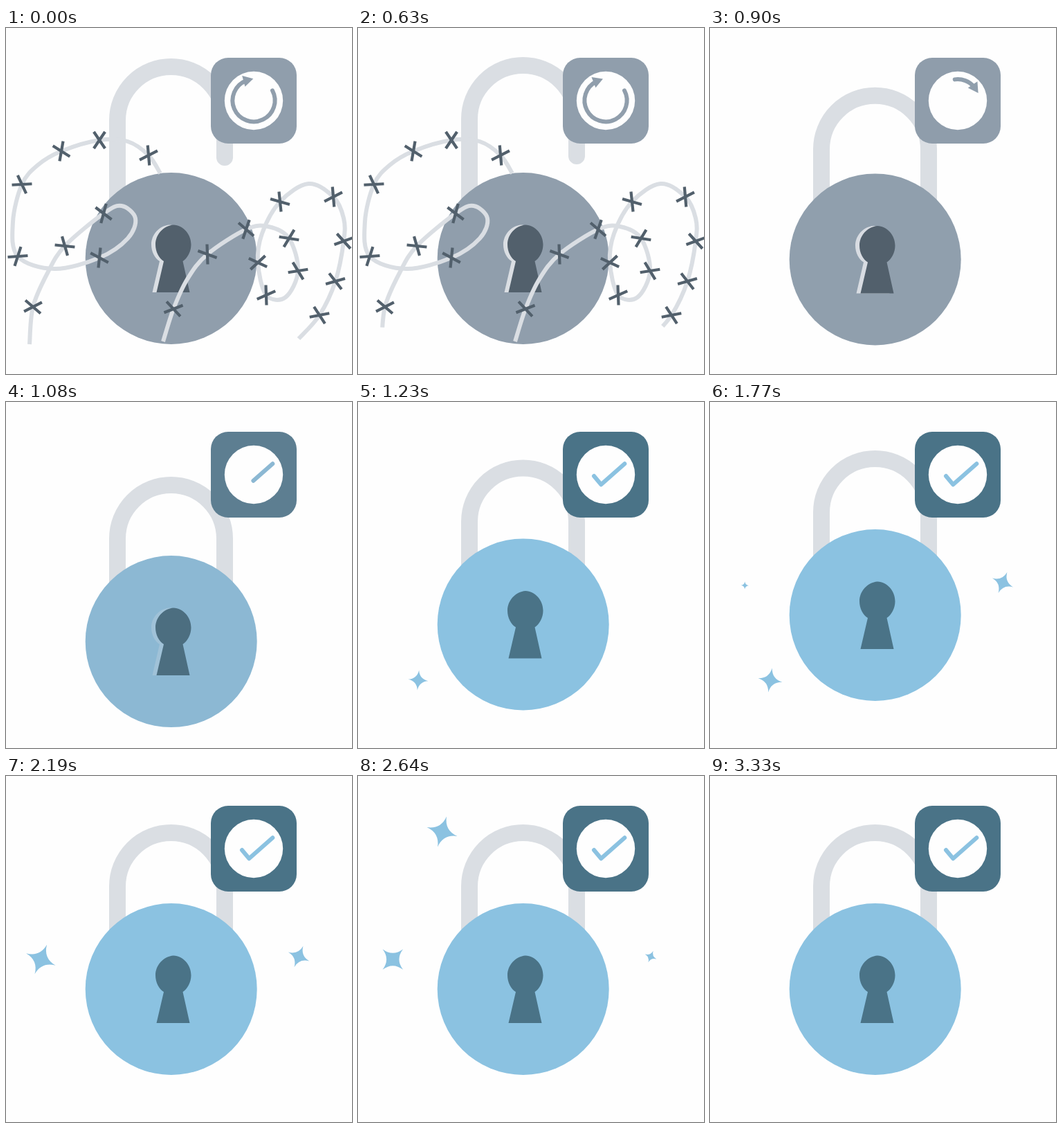
Animation, 500 px wide and 500 px high, one loop 3.66 s. Source, as an HTML page:

```html
<!DOCTYPE html>
<html lang="en">
<head>
<meta charset="utf-8">
<title>Lock</title>
<style>
html, body { margin: 0; width: 100%; height: 100%; overflow: hidden; background: #fefefe; }
svg { display: block; width: 100%; height: 100%; }
</style>
</head>
<body>
<svg viewBox="0 0 500 500" fill="none">
  <path id="shackle" stroke="#dadee3" stroke-width="24" stroke-linecap="round"/>
  <g id="lock">
    <circle id="disc" cx="238.7" r="124"/>
    <path id="shine" fill="#dadee3" transform="translate(-6 0)"/>
    <path id="hole"/>
  </g>
  <g id="wires"></g>
  <g id="stars" fill="#8bc2e1"></g>
  <rect id="badge" x="296" y="43" width="124" height="124" rx="25"/>
  <circle cx="358" cy="105" r="42.2" fill="#fefefe"/>
  <g stroke-width="6" stroke-linecap="round" stroke-linejoin="round">
    <path id="arc"/>
    <path id="head" d="M-7 -8.2L7.5 0L-7 8.2Z" stroke="none"/>
    <path id="check" d="M385.3 89.3L351.3 119.3L341 107" pathLength="100"/>
  </g>
</svg>
<script>
const LOOP = 3660, STEP = 30, REST = 630;
const $ = id => document.getElementById(id);
const set = (el, attrs) => { for (const k in attrs) el.setAttribute(k, attrs[k]); };
const show = (el, on) => { el.style.display = on ? '' : 'none'; };
const addPath = (parent, attrs) => {
  const el = document.createElementNS('http://www.w3.org/2000/svg', 'path');
  set(el, attrs);
  return parent.appendChild(el);
};

const easeIn = p => p * p;
const easeOut = p => 1 - (1 - p) * (1 - p);
const easeBoth = p => p < .5 ? 2 * p * p : 1 - 2 * (1 - p) * (1 - p);
const clamp = v => Math.min(1, Math.max(0, v));
const span = (t, a, b) => clamp((t - a) / (b - a));

const polar = (deg, r) => {
  const a = deg * Math.PI / 180;
  return [r * Math.cos(a), r * Math.sin(a)];
};
const mix = (a, b, p) => `rgb(${a.map((v, i) => Math.round(v + (b[i] - v) * p))})`;
const GREY = [144, 158, 172], SLATE = [82, 96, 108], BLUE = [139, 194, 225], TEAL = [74, 115, 135];

const keyhole = 'M242 -48.5C256 -48 267.5 -35 267.5 -20C267.5 -10 262 0 255.5 4L265.5 49H217.5L228 4' +
  'C221 0 216 -10 216 -20C216 -35 228 -47.5 242 -48.5Z';
set($('shine'), { d: keyhole });
set($('hole'), { d: keyhole });

// Smooth curve through points
function spline(pts) {
  let d = `M${pts[0][0]} ${pts[0][1]}`;
  for (let i = 0; i < pts.length - 1; i++) {
    const a = pts[i - 1] || pts[i], b = pts[i], c = pts[i + 1], e = pts[i + 2] || c;
    d += `C${b[0] + (c[0] - a[0]) / 6} ${b[1] + (c[1] - a[1]) / 6} ` +
      `${c[0] - (e[0] - b[0]) / 6} ${c[1] - (e[1] - b[1]) / 6} ${c[0]} ${c[1]}`;
  }
  return d;
}

// Key points from the lock outwards; a third value puts a barb there at that angle
const leftWire = [[223, 210], [206, 184, -61], [176, 164], [135, 162, 90], [80, 178, 66], [46, 198],
  [23, 226, 31], [10, 280], [17, 330, -38], [70, 348], [135, 332, 62], [176, 304], [187, 275],
  [167, 257], [141, 268, 71], [85, 315, 40], [60, 354], [39, 403, 7], [34, 457]];
const rightWire = [[227, 453], [242, 406, 13], [262, 363], [291, 327, 54], [347, 291, 75], [379, 287],
  [409, 304, -25], [422, 351, 25], [404, 389], [376, 386, -58], [364, 339, -9], [370, 297],
  [396, 251, 50], [437, 225], [473, 244, -61], [488, 275], [488, 308, 14], [476, 366, 18],
  [453, 415, 23], [423, 449]];

function makeWire(pts) {
  const path = addPath($('wires'), { stroke: '#dadee3', 'stroke-width': 6 });
  const measure = n => {
    set(path, { d: spline(pts.slice(0, n)) });
    return path.getTotalLength();
  };
  const barbs = [];
  pts.forEach(([x, y, tilt], i) => {
    if (tilt === undefined) return;
    const stroke = deg => {
      const [dx, dy] = polar(deg, 14.5);
      return `M${-dx} ${-dy}L${dx} ${dy}`;
    };
    const el = addPath($('wires'), {
      d: stroke(tilt - 34) + stroke(tilt + 34), stroke: '#52606c', 'stroke-width': 4.2
    });
    barbs.push({ x, y, el, at: measure(i + 1) });
  });
  return { path, barbs, len: measure(pts.length) };
}
const wires = [leftWire, rightWire].map(makeWire);

const stars = [
  { x: 87, y: 402, from: 1140, to: 1890, size: 23, tilt: 4, spin: 8 },
  { x: 423, y: 261, from: 1560, to: 2715, size: 16.5, tilt: 23, spin: 0 },
  { x: 50.3, y: 265, from: 1740, to: 2800, size: 23, tilt: 0, spin: 50 },
  { x: 121.5, y: 80.5, from: 2400, to: 3180, size: 23, tilt: 13, spin: 14 }
];
for (const s of stars) {
  s.el = addPath($('stars'), { d: 'M0 -1Q.12 -.12 1 0Q.12 .12 0 1Q-.12 .12 -1 0Q-.12 -.12 0 -1Z' });
}

function drawLock(t, tint) {
  const y = 333 + 16 * easeBoth(span(t, 870, 1010)) - 41 * easeBoth(span(t, 1010, 1380));
  const swing = 44 - 16 * easeBoth(span(t, 600, 720)) + 75 * easeIn(span(t, 720, 925));
  const top = t < 930 ? swing : y - 238;
  const leg = 143 + 25 * span(t, 690, 870);
  set($('shackle'), {
    d: `M161 260V89.5A77.5 77.5 0 0 1 316 89.5V${leg}`,
    transform: `translate(0 ${top})`
  });
  set($('lock'), { transform: `translate(0 ${y})` });
  set($('disc'), { fill: mix(GREY, BLUE, tint) });
  set($('badge'), { fill: mix(GREY, TEAL, tint) });
  set($('hole'), { fill: mix(SLATE, TEAL, tint) });
  set($('shine'), { opacity: 1 - tint });
}

function drawWires(t) {
  const keep = 1 - Math.pow(span(t, 600, 870), 1.6);
  show($('wires'), keep > 0);
  for (const { path, len, barbs } of wires) {
    set(path, { 'stroke-dasharray': `${keep * len} ${len * 2}` });
    for (const b of barbs) {
      const k = clamp((keep * len - b.at) / 20 + .5);
      set(b.el, { transform: `translate(${b.x} ${b.y}) scale(${k})` });
    }
  }
}

function drawIcon(t, tint) {
  const color = mix(GREY, BLUE, tint);
  const onRing = deg => polar(deg, 30.6).map((v, i) => v + [358, 104.7][i]);
  const tail = -28 + 358 * easeIn(span(t, 630, 930));
  const head = -105 - 11 * easeOut(span(t, 600, 690)) + 85 * easeBoth(span(t, 690, 930));
  const end = head + 354;
  const sweep = end - tail;
  show($('arc'), sweep > 0);
  set($('arc'), {
    d: `M${onRing(tail)}A30.6 30.6 0 ${sweep > 180 ? 1 : 0} 1 ${onRing(end)}`,
    stroke: color
  });
  set($('head'), {
    transform: `translate(${onRing(head)}) rotate(${head + 90}) scale(${1 - span(t, 900, 960)})`,
    fill: color
  });
  const drawn = 100 * easeBoth(span(t, 930, 1200));
  show($('check'), drawn > 0);
  set($('check'), { stroke: color, 'stroke-dasharray': `${drawn} 200` });
}

function drawStar(s, t) {
  const r = s.size * easeOut(span(t, s.from, s.from + 230)) * (1 - easeIn(span(t, s.to - 230, s.to)));
  const turn = s.tilt + s.spin * (t - s.from) / 1000;
  show(s.el, r > 0);
  set(s.el, { transform: `translate(${s.x} ${s.y}) rotate(${turn}) scale(${r})` });
}

function draw(t) {
  const tint = easeBoth(span(t, 870, 1200));
  drawLock(t, tint);
  drawWires(t);
  drawIcon(t, tint);
  stars.forEach(s => drawStar(s, t));
}

const begin = performance.now();
function tick() {
  const t = Math.max(0, performance.now() - begin) % LOOP;
  draw(t < REST ? 0 : Math.floor(t / STEP) * STEP);
  requestAnimationFrame(tick);
}
tick();
</script>
</body>
</html>
```
